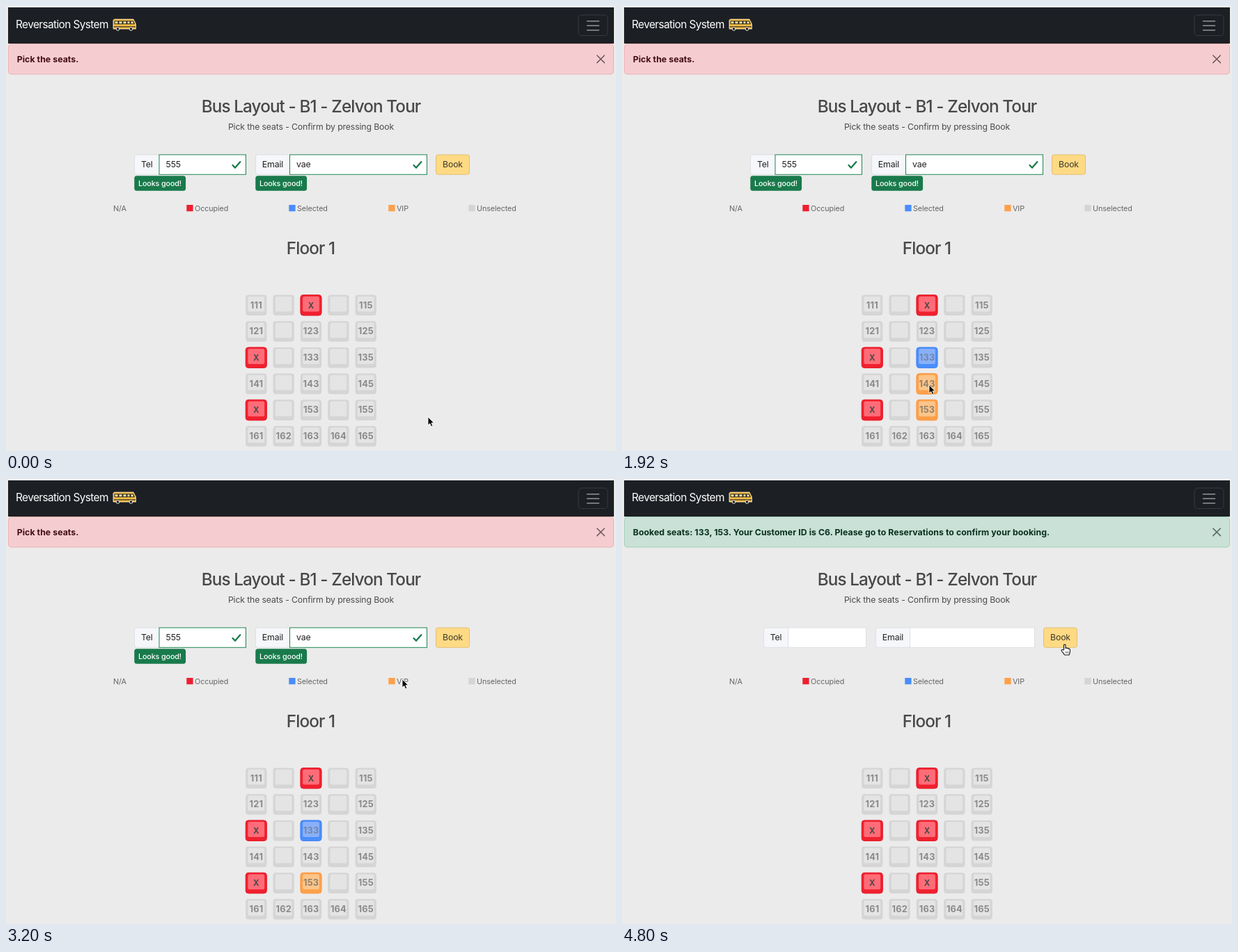
An HTML page that plays this animation: 876 by 640 pixels, repeating every 4880 ms.

```html
<!DOCTYPE html>
<html lang="en">
<head>
<meta charset="utf-8">
<title>Bus Layout</title>
<style>
  html, body { margin: 0; width: 100%; height: 100%; overflow: hidden; background: #ebebeb; }
  svg { display: block; width: 876px; height: 640px; font: 12.3px Inter, "Open Sans", sans-serif; letter-spacing: -.15px; }
  .mid { text-anchor: middle; }
  .brand { font-size: 15.4px; letter-spacing: -.6px; fill: #fff; }
  .head { font-size: 24.3px; font-weight: 500; letter-spacing: -.9px; fill: #484848; }
  .sub { fill: #4c4c4c; }
  .legend { font-size: 10.8px; letter-spacing: -.1px; fill: #666; }
  .line { fill: none; stroke-linecap: round; stroke-linejoin: round; }

  .alert rect { fill: #f5cdd0; stroke: #ecb0b6; }
  .alert text { font-weight: 700; letter-spacing: .055px; fill: #420d14; }
  .alert path { stroke: #705a5d; stroke-width: 1.5; }
  .alert.ok rect { fill: #c9e1d6; stroke: #a6d0bb; }
  .alert.ok text { fill: #0a3020; }
  .alert.ok path { stroke: #56675f; }

  .label { fill: #f6f7fa; stroke: #dcdfe4; }
  .input { fill: #fff; stroke: #dcdfe4; }
  .valid .input { stroke: #1f8453; }
  .field { fill: #222; }
  .tick { stroke: #197a4b; stroke-width: 2.3; }
  .badge rect { fill: #197a4b; }
  .badge text { font-size: 10.8px; font-weight: 500; fill: #fff; }
  .book rect { fill: #ffda84; stroke: #dfc07a; }
  .book text { fill: #40382a; }

  .seat text { font-size: 12.8px; font-weight: 700; letter-spacing: .2px; fill: #8a8a8a; }
  .seat .rim { fill: #d5d5d5; }
  .seat .pad { fill: #e4e4e4; }
  .occ .rim { fill: #f0202f; stroke: #e61f2e; }
  .occ .pad { fill: #ff6c77; }
  .seat.occ text { font-size: 11.6px; fill: #4a4a4a; }
  .sel .rim { fill: #4a8dfb; stroke: #4689f6; }
  .sel .pad { fill: #89b0f9; }
  .seat.sel text { fill: #7587a9; }
  .vip .rim { fill: #fda04a; stroke: #f99c47; }
  .vip .pad { fill: #fcc589; }
  .seat.vip text { fill: #92806b; }
  .ring { fill: none; stroke: #5663c6; stroke-width: 1.8; }
  .ring.sel { stroke: #3f63e4; }
</style>
</head>
<body>
<svg viewBox="0 0 876 640">
  <rect x="3" y="2" width="870" height="52" fill="#1c1f24"/>
  <text class="brand" x="14" y="32">Reversation System</text>

  <g id="bus">
    <path d="M155.5 19H183L186.5 26V33H154V20.5Z" fill="#f6bd45" stroke="#f4e3b5" stroke-width=".8"/>
    <path d="M155.5 21.3H183L185 26.2H155.5ZM155 29.2H186V30.4H155Z" fill="#2b2822"/>
    <path d="M156.5 22.3h4v3h-4zM162.5 22.3h4v3h-4zM168.5 22.3h4v3h-4zM174.5 22.3h3v3h-3zM179.5 22.3h2.7l1 3h-3.7z" fill="#f8dc9a"/>
    <g fill="#1c1f24" stroke="#f1ead9"><circle cx="160.5" cy="33" r="2.3"/><circle cx="179.5" cy="33" r="2.3"/></g>
  </g>

  <rect x="822" y="13" width="42" height="29.5" rx="4.5" fill="none" stroke="#383b40"/>
  <path class="line" d="M834.5 21.7h17M834.5 28.2h17M834.5 34.7h17" stroke="#929497" stroke-width="1.4"/>

  <g class="alert" id="alert">
    <rect x="3.5" y="54.5" width="869" height="43.5" rx="4"/>
    <text x="15.7" y="81"></text>
    <path class="line" d="M848.8 71l10.6 10.6M859.4 71l-10.6 10.6"/>
  </g>

  <text class="head mid" x="438" y="153">Bus Layout - B1 - Zelvon Tour</text>
  <text class="sub mid" x="438" y="178">Pick the seats - Confirm by pressing Book</text>
  <g id="filled" class="valid"></g>
  <g id="blank"></g>
  <g id="legend" class="legend"></g>
  <text class="head mid" x="437.5" y="357">Floor 1</text>
  <g id="seats"></g>
  <rect class="ring" id="ring" width="32.6" height="31" rx="5.5"/>

  <g id="cursor" stroke-linejoin="round">
    <path id="arrow" d="M0 0V12L2.8 9.5 4.6 13.8 6.8 12.9 5 8.7H8.7Z" fill="#000" stroke="#fff" stroke-width=".9"/>
    <g id="hand">
      <path d="M-1.5 8V1.2C-1.5-.5 1-.5 1 1.2V5.5C1.1 4.4 3.2 4.5 3.3 5.8 3.5 5 5.4 5.2 5.5 6.4 5.9 5.8 7.4 6 7.4 7.4V10.3C7.4 12.5 6.2 13.2 6.1 15H-.6C-.9 13.2-3.4 11.3-4.7 9.2-5.4 7.6-3.8 6.7-2.8 7.7Z" fill="#fff" stroke="#111" stroke-width="1.1"/>
      <path d="M1.3 10v2.6M3.1 10v2.6M4.9 10v2.6" stroke="#222" stroke-width=".7"/>
    </g>
  </g>
</svg>

<script>
const LOOP = 4880, STEP = 80, DONE = 4480;
const $ = id => document.getElementById(id);
const show = (el, on) => { el.style.display = on ? '' : 'none'; };

const box = (cls, x, w) => `<rect class="${cls}" x="${x + .5}" y="213.9" width="${w}" height="28.4" rx="3"/>`;

function field(name, x, labelW, inputW, value) {
  const left = x + labelW, right = left + inputW;
  let out = box('label', x, labelW + 2) + `<rect class="input" x="${left + .5}" y="213.9" width="${inputW - 1}" height="28.4"/>` +
    `<text class="field mid" x="${x + labelW / 2 + .5}" y="232">${name}</text>`;
  if (value) out += `<text class="field" x="${left + 10}" y="232">${value}</text>
    <path class="line tick" d="M${right - 19.5} 229l3.6 3.6 7.2-8.4"/>
    <g class="badge"><rect x="${x + .3}" y="244.2" width="73.8" height="21.6" rx="3.5"/>
    <text class="mid" x="${x + 37}" y="259">Looks good!</text></g>`;
  return out;
}

const book = x => `<g class="book">${box('', x, 48)}<text class="mid" x="${x + 24.5}" y="232">Book</text></g>`;

$('filled').innerHTML = field('Tel', 184, 35.5, 125.5, '555') + field('Email', 358, 49, 198, 'vae') + book(617);
$('blank').innerHTML = field('Tel', 203, 35, 113) + field('Email', 364, 49, 180) + book(605);

$('legend').innerHTML = [['N/A', 142], ['Occupied', 259, '#ee2030'], ['Selected', 406, '#4a8dfb'],
  ['VIP', 549, '#fda04a'], ['Unselected', 664, '#d5d5d5']].map(([name, x, color]) =>
  (color ? `<rect x="${x + .3}" y="286" width="9.3" height="9.3" fill="${color}"/>` : '') +
  `<text x="${x + 12}" y="295">${name}</text>`).join('');

const seatX = c => 344.2 + 39.35 * c, seatY = r => 415.5 + 37.7 * r;
let seatMarkup = '';
for (let r = 0; r < 6; r++) for (let c = 0; c < 5; c++) {
  const id = 111 + r * 10 + c, named = r === 5 || c % 2 === 0;
  seatMarkup += `<g class="seat" id="s${id}" transform="translate(${seatX(c)} ${seatY(r)})">
    <rect class="rim" width="30.2" height="29.6" rx="4"/><rect class="pad" x="3.2" y="2.2" width="23.8" height="21.8" rx="2.5"/>
    <text class="mid" x="15.2" y="19.2">${named ? id : ''}</text></g>`;
}
$('seats').innerHTML = seatMarkup;

function setSeat(id, state) {
  const seat = $('s' + id);
  seat.setAttribute('class', 'seat ' + state);
  seat.querySelector('text').textContent = state === 'occ' ? 'X' : id;
}
[113, 131, 151].forEach(id => setSeat(id, 'occ'));

// Clicks as [time, new state]
const clicks = {
  133: [[720, 'sel'], [DONE, 'occ']],
  143: [[1280, 'sel'], [1360, 'vip'], [2720, '']],
  153: [[1600, 'sel'], [1680, 'vip'], [DONE, 'occ']]
};
const stateAt = (id, t) => clicks[id].reduce((s, [at, next]) => t >= at ? next : s, '');

// Pointer stops as [time, x, y]
const path = [[0, 606, 591], [640, 439, 512], [960, 439, 512], [1200, 440, 553], [1360, 440, 553],
  [1520, 440, 580], [1680, 440, 580], [1840, 441, 545], [2080, 441, 545], [2320, 440, 516], [2480, 440, 516],
  [2640, 440, 547], [2800, 440, 547], [3200, 569, 288], [3360, 569, 288], [3760, 636, 239],
  [4400, 636, 239], [DONE, 636, 238], [LOOP, 636, 238]];

function pointerAt(t) {
  const i = path.findIndex(p => p[0] > t), [t0, x0, y0] = path[i - 1], [t1, x1, y1] = path[i];
  const u = (t - t0) / (t1 - t0), k = u * u * (3 - 2 * u);
  return [x0 + (x1 - x0) * k, y0 + (y1 - y0) * k];
}

function render(t) {
  const done = t >= DONE, [x, y] = pointerAt(t);
  for (const id in clicks) setSeat(id, stateAt(id, t));

  $('alert').setAttribute('class', done ? 'alert ok' : 'alert');
  $('alert').querySelector('text').textContent = done
    ? 'Booked seats: 133, 153. Your Customer ID is C6. Please go to Reservations to confirm your booking.'
    : 'Pick the seats.';
  show($('filled'), !done);
  show($('blank'), done);

  const col = Math.floor((x - seatX(0)) / 39.35), row = Math.floor((y - seatY(0)) / 37.7);
  const idle = t >= 1840 && t < 2160;
  const onSeat = !idle && col >= 0 && col < 5 && row >= 0 && row < 6 &&
    x - seatX(col) < 30.2 && y - seatY(row) < 29.6;
  const onBook = x > 617 && x < 666 && y > 213 && y < 243;
  show($('ring'), onSeat);
  if (onSeat) {
    const id = 111 + row * 10 + col;
    $('ring').setAttribute('class', 'ring ' + (clicks[id] ? stateAt(id, t) : ''));
    $('ring').setAttribute('transform', `translate(${seatX(col) - 1.2} ${seatY(row) - .8})`);
  }
  show($('hand'), onSeat || onBook);
  show($('arrow'), !(onSeat || onBook));
  $('cursor').setAttribute('transform', `translate(${x} ${y})`);
}

let last = -1;
const start = performance.now();
function tick() {
  const t = Math.floor((performance.now() - start) % LOOP / STEP) * STEP;
  if (t !== last) render(last = t);
  requestAnimationFrame(tick);
}
tick();
</script>
</body>
</html>
```
